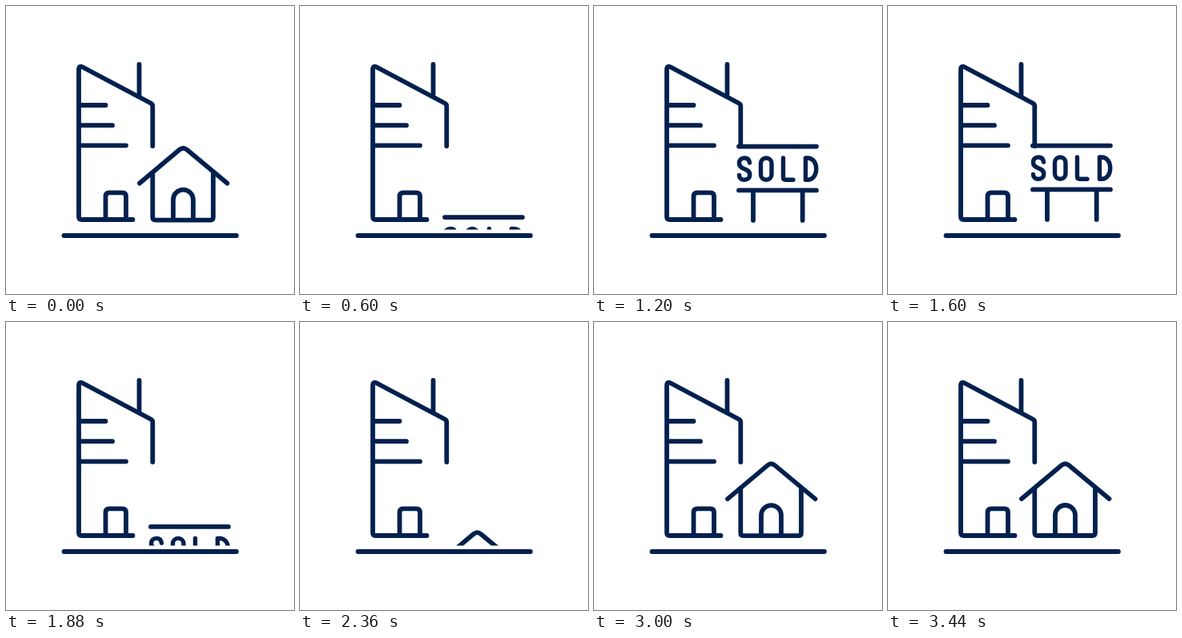
These frames come from a looping animation (360 by 360 pixels, 3480 ms). An HTML page:

```html
<!DOCTYPE html>
<html lang="en">
<head>
<meta charset="utf-8">
<title>House sold</title>
<style>
  html, body { margin: 0; width: 100%; height: 100%; overflow: hidden; background: #fff; }
  svg { display: block; width: 100vw; height: 100vh; }
</style>
</head>
<body>
<svg viewBox="0 0 360 360" fill="none" stroke="#02204e" stroke-width="5.8" stroke-linecap="round" stroke-linejoin="round">
  <clipPath id="above"><rect width="360" height="279.5"/></clipPath>

  <path d="M72.5 287H288"/>
  <g id="tower">
    <path d="M158.5 267H94.5Q91 267 91 263.5V79.5Q91 74 96 76.5L181 121.5Q183.3 122.7 183.3 125V175"/>
    <path d="M166.5 73V112M92 124H124.5M92 149.2H133M92 174.3H150"/>
    <path d="M124.5 266V238Q124.5 233.3 129 233.3H145.5Q150 233.3 150 238V266"/>
  </g>

  <g clip-path="url(#above)">
    <g id="house">
      <path d="M167 221L217 179Q221.5 175.3 226 179L276.5 221"/>
      <path d="M183.3 209V263.5Q183.3 267 187 267H255.5Q259 267 259 263.5V209"/>
      <path d="M209 266V241.5a12.5 12.5 0 0 1 25 0V266"/>
    </g>
    <g id="sign" role="img" aria-label="SOLD">
      <path d="M181 174.6H278M181 229.5H278M199 230V267M260.7 230V267"/>
      <g stroke-width="5.4">
        <path d="M194.5 195C194 191 191.500 189 188 189C184 189 181.500 191.500 181.500 195.500C181.500 204.500 194.800 201 194.800 210C194.800 214 192 216.300 188 216.300C184 216.300 181.500 214 181.500 210.500"/>
        <rect x="208.500" y="189" width="13.500" height="27.300" rx="6.700"/>
        <path d="M236.500 189V213.300Q236.500 216.300 239.500 216.300H249"/>
        <path d="M264.500 189V216.300H267C273.500 216.300 277.800 210.500 277.800 202.600S273.500 189 267 189Z"/>
      </g>
    </g>
  </g>
</svg>
<script>
  const LOOP = 3480, TRAVEL = 120, DROP_SPEED = 0.577;
  const parts = [
    { el: document.getElementById('house'), land: 2510, speed: 0.577, leave: LOOP },
    { el: document.getElementById('sign'), land: 780, speed: 0.5, leave: LOOP / 2 }
  ];

  // Damped swing that carries on past the resting place after landing.
  const bounce = s => -30 * Math.sin(8 * Math.PI * s) * Math.exp(-8 * s);

  function offset({ land, speed, leave }, time) {
    // Measure time from the moment the part starts to leave.
    const t = (time - leave + 2 * LOOP) % LOOP;
    const arrive = land - leave + LOOP;
    if (t < arrive) return Math.min(TRAVEL, t * DROP_SPEED, (arrive - t) * speed);
    return bounce((t - arrive) / 1000);
  }

  function draw() {
    const time = performance.now() % LOOP;
    for (const part of parts) {
      const y = offset(part, time);
      part.el.setAttribute('transform', `translate(0 ${y.toFixed(2)})`);
      part.el.setAttribute('visibility', y > 107 ? 'hidden' : 'visible');
    }
    requestAnimationFrame(draw);
  }
  draw();
</script>
</body>
</html>
```
